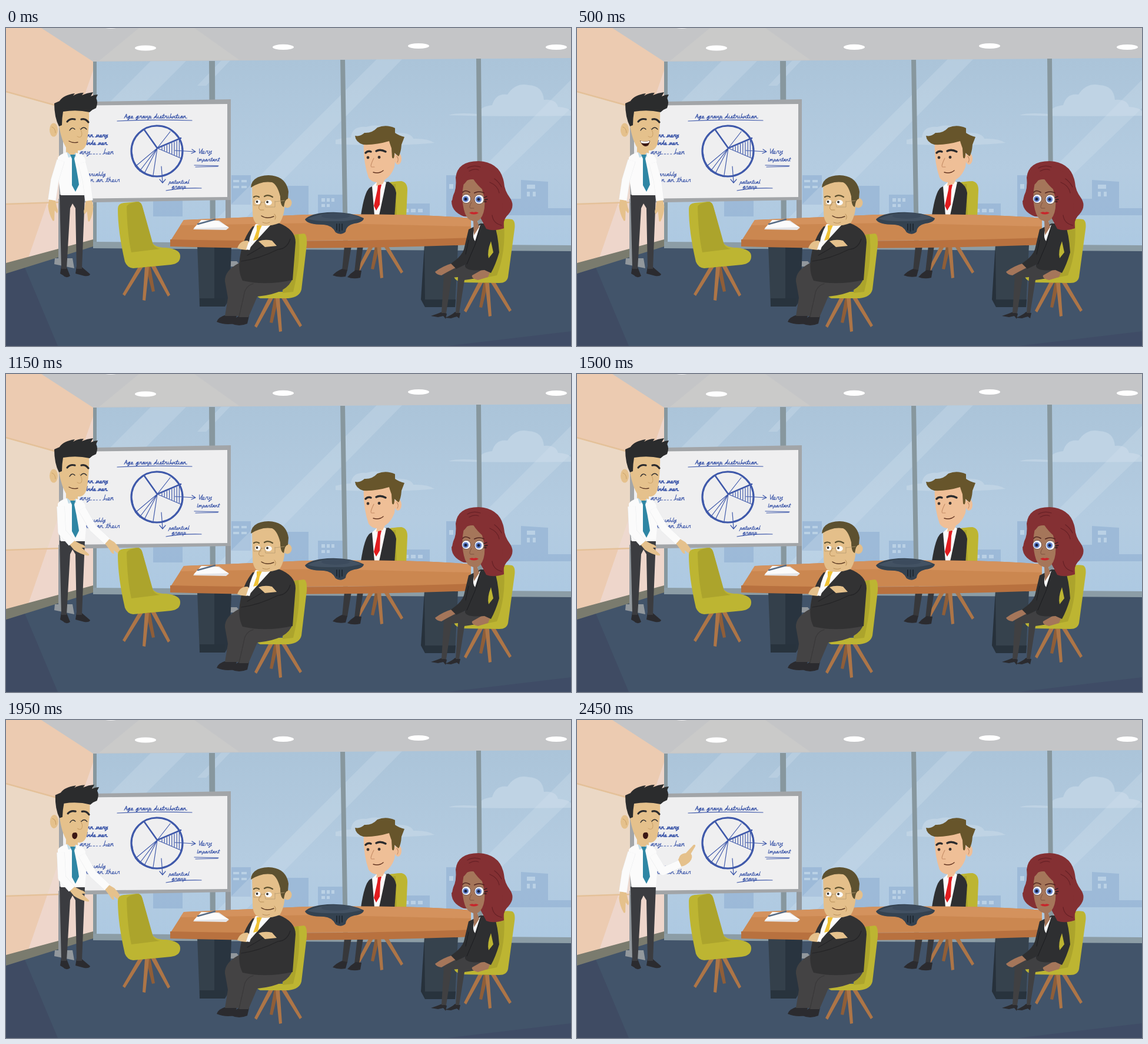
An HTML page for the animation above (2500 ms loop, 960x540 px).

```html
<!DOCTYPE html>
<html lang="en">
<head>
<meta charset="utf-8">
<title>Meeting room</title>
<style>
html, body { margin: 0; width: 100%; height: 100%; overflow: hidden; background: #42546a; }
svg { display: block; width: 100vw; height: 100vh; }
.line { fill: none; stroke-linecap: round; stroke-linejoin: round; }
.ink { stroke: #3f59aa; stroke-width: 1.2; }
.dark { stroke: #2b2b2d; }
.seat { fill: #bdb532; }
.shade { fill: #aca42c; }
.tan { fill: #e5c18c; }
.brown { fill: #a5765a; }
.suit { fill: #2e2f31; }
.shoe { fill: #2b2b2f; }
.white { fill: #fbfbfb; }
.town { fill: #8fb0d2; opacity: .6; }
.haze { fill: #d3e1ec; opacity: .28; }
</style>
</head>
<body>
<svg viewBox="0 0 960 540">
<defs>
  <linearGradient id="sky" x1="0" y1="0" x2="0" y2="1">
    <stop offset="0" stop-color="#abc4d9"/><stop offset=".6" stop-color="#b4cce1"/><stop offset="1" stop-color="#adc9e2"/>
  </linearGradient>
  <clipPath id="pane"><path d="M148 57L960 51V372L148 366z"/></clipPath>
  <g id="legs">
    <path fill="#8f5e38" d="M-5-3H3L-8 42L-13 41z"/>
    <path fill="#ad7547" d="M-14-2H-6L-35 50L-39 47zM-3 0H4L8 56L3 57zM6-2H14L42 46L38 49z"/>
  </g>
</defs>

<!-- room -->
<path fill="#c4c5c7" d="M0 0H960V60H0z"/>
<path fill="#cacac9" d="M226 0H320L396 54L158 56z"/>
<g fill="#fff">
  <ellipse cx="178" cy="-2" rx="13" ry="2.8"/><ellipse cx="237" cy="34" rx="18" ry="4.6"/>
  <ellipse cx="471" cy="32.4" rx="18" ry="4.6"/><ellipse cx="701" cy="30.5" rx="18" ry="4.6"/>
  <ellipse cx="935" cy="32.5" rx="18" ry="4.6"/>
</g>
<path fill="#42546a" d="M0 416L148 366H960V540H0z"/>
<path fill="#3f4b63" d="M0 417L32 407L88 540H0z"/>
<path fill="#3f4c66" d="M750 540L960 515V540z"/>
<path fill="url(#sky)" d="M148 57L960 51V372L148 366z"/>
<g clip-path="url(#pane)">
  <g fill="#bfd3e4">
    <path d="M752 148Q768 143 801 146Q806 133 826 131Q832 110 852 113Q866 92 888 97Q912 98 914 122Q934 120 938 134Q955 135 960 141V149Q850 151 752 148z"/>
    <path d="M560 190Q574 186 586 186Q588 166 612 168Q640 160 655 178Q688 176 692 188Q716 187 728 195Q660 202 560 197z"/>
  </g>
  <path class="town" d="M383 250H416V300H383zM470 268H514V330H470zM530 283H573V330H530zM668 298H720V320H668zM748 250H776V322H748zM840 290H875V258L921 261V306H960V318H840zM250 290H300V320H250z"/>
  <path fill="#c4d8ea" opacity=".75" d="M386 258h10v4h-10zM400 258h9v4h-9zM386 268h10v4h-10zM400 268h9v4h-9zM536 289h6v6h-6zM545 289h5v6h-5zM553 289h5v6h-5zM536 299h6v5h-6zM545 299h5v5h-5zM676 307h8v6h-8zM688 307h8v6h-8zM700 307h8v6h-8zM753 265h7v8h-7zM885 266h14v7h-14zM885 278h5v8h-5zM895 278h5v8h-5z"/>
  <path class="haze" d="M246 56H306L148 214V154zM366 55H381L340 98H325zM630 53H673L400 330H352zM960 88V136L800 290V248z"/>
</g>
<path fill="#87979e" d="M147 57H154V366H147zM345 56H355L356 368H347zM568 54H576L581 370H573zM799 52H807L810 372H802z"/>
<path fill="#8c9da6" d="M148 363L960 369V379L148 374z"/>
<path fill="#eccbb1" d="M0 0H60L148 57V362L0 400z"/>
<path fill="#ebd8c5" d="M0 109L148 150V294L0 299z"/>
<path fill="#efdad3" opacity=".8" d="M148 72V362L38 390z"/>
<path fill="none" stroke="#e4c199" stroke-width="2.5" d="M0 108L148 149M0 299L148 294"/>
<path fill="#7a7b6e" d="M0 399L148 359V371L0 417z"/>

<!-- whiteboard -->
<path fill="#92989d" d="M373 290H382V398H373zM89 290H96V395H89zM83 391H113L116 408L82 401zM376 396H392L400 405H376z"/>
<path fill="#a2a5a8" d="M90 126L382 121V292L90 297z"/>
<path fill="#efeff0" d="M97 132L376 129V287L97 290z"/>
<g class="line ink" id="notes">
  <path d="M189 158Q250 155 316 157"/>
  <ellipse cx="256.5" cy="209" rx="43.5" ry="43" stroke-width="3.2"/>
  <path stroke-width="2.6" d="M257 204L235 173M257 204L297 187M214 214Q216 245 250 252"/>
  <path d="M257 204L279 176M257 204L299 222M257 204L250 250M257 204L235 247M257 204L227 243M257 204L220 235"/>
  <path id="hatch"/>
  <path d="M287 208L321 210M316 206L322 210L315 213M320 233L361 234M322 236L360 235M264 235L266 262M261 257L266 263L271 257M272 276Q300 271 332 272"/>
</g>

<!-- presenter -->
<g>
  <path class="shoe" d="M94 404L103 406L109 421Q102 426 97 420L92 417zM120 404L129 406L143 418Q142 422 133 421L118 417z"/>
  <path fill="#3b3c40" d="M91 283H134L129 409H120L118 306L113 298L109 306L103 409H94z"/>
  <path class="tan" d="M102 200H122V216L113 221L102 214z"/>
  <path class="white" d="M88 220Q92 214 103 211L113 219L119 212Q132 214 135 224L137 250L134 284H93L88 250z"/>
  <path fill="#c3dce8" d="M103 210L113 218L106 220zM119 211L113 218L119 219z"/>
  <path fill="#2f86a4" d="M109 215H118L116 222Q121 244 124 266L118 278L112 267L112 222z"/>
  <g id="arms"></g>
  <g id="head">
    <ellipse class="tan" cx="81" cy="173" rx="7" ry="11.5"/>
    <path class="tan" d="M94 136H141Q142 165 138 190Q136 206 126 208Q110 208 104 206Q94 192 90 165z"/>
    <path class="line" stroke="#c9a067" d="M78 168Q84 170 84 178M125 170Q131 178 128 184Q125 187 121 184"/>
    <path fill="#2b2c2d" d="M90 167Q82 152 82 128L91 124Q97 114 117 111L114 115Q122 110 132 110L129 114Q138 110 148 109L144 116Q150 113 156 113L153 119Q157 126 153 136Q147 138 142 143Q120 138 97 142Q95 153 95 165z"/>
    <path class="line dark" stroke-width="3.2" d="M104 159Q109 153 117 155M128 155Q135 153 140 160"/>
    <path class="line dark" stroke-width="1.3" d="M108 174Q112 167 117 172M127 172Q132 166 137 172"/>
    <g id="mouths">
      <path class="line" stroke="#5a3524" stroke-width="1.3" d="M107 192Q114 196 122 194"/>
      <path fill="#3b1714" d="M116 191Q121 190 121 196Q120 202 116 202Q112 201 112 196Q112 191 116 191z"/>
      <g><path fill="#3b1714" d="M107 191Q115 194 124 191Q123 201 116 201Q110 200 107 191z"/><path fill="#fff" d="M108 191.5Q116 194 123.5 191.5L122 195Q115 197 109 195z"/></g>
      <g><path fill="#3b1714" d="M107 190Q116 193 124 190Q124 205 117 206Q110 203 107 190z"/><path fill="#fff" d="M108 191Q116 193.5 123.5 191L123 194Q116 196 109 194z"/><path fill="#c75a50" d="M112 202Q117 199 121 202Q117 208 112 202z"/></g>
    </g>
  </g>
</g>

<!-- man behind the table -->
<use href="#legs" x="633" y="368"/>
<path class="seat" d="M640 268Q644 261 672 260Q682 262 682 275L680 322H645z"/>
<path class="shade" d="M645 266L662 265L664 322H645z"/>
<path fill="#37383b" d="M575 370H587L580 412H571zM597 370H607L600 414H592z"/>
<path class="shoe" d="M555 420Q561 413 571 409L580 411L577 422Q565 424 555 420zM580 423Q586 416 594 411L604 412L602 424Q590 427 580 423z"/>
<path class="suit" d="M603 318Q609 278 618 271L634 263L650 261Q661 267 663 280L660 322H603z"/>
<path class="white" d="M622 269L634 258L646 262L634 318H626z"/>
<path fill="#e21c1f" d="M632 266H638L636 275L635 300L629 310L625 302L631 275z"/>
<g fill="#efbf97">
  <ellipse cx="666" cy="222" rx="6" ry="10"/>
  <path d="M608 190L658 188Q663 215 660 236Q654 252 644 257L640 265L629 268L630 262Q620 261 616 254Q606 225 608 190z"/>
</g>
<path fill="#67552b" d="M593 183Q602 185 609 178Q622 179 631 169Q646 163 661 170V178Q668 183 677 185L672 198Q671 212 667 218L660 212Q660 225 656 220L655 204Q652 196 651 192Q628 199 607 198Q594 194 593 183z"/>
<path class="line dark" stroke-width="3.4" d="M611 212Q615 208 620 210M629 209Q636 205 645 210"/>
<g fill="#3b3330"><circle cx="615" cy="220" r="2.4"/><circle cx="634" cy="219.5" r="2.4"/></g>
<path class="line" stroke="#c58c66" stroke-width="1.1" d="M625 221Q618 235 621 236L626 236M664 218Q668 222 665 228"/>
<path class="line" stroke="#633421" stroke-width="1.4" d="M624 245Q634 248 641 242"/>

<!-- table -->
<path fill="#34404b" d="M325 370H354V473H329z"/><path fill="#29343f" d="M354 370H383L380 460L372 473H354z"/>
<path fill="#28333d" d="M329 459H372V473H329z"/>
<path fill="#27313b" d="M711 368L705 461L712 474L716 368z"/><path fill="#36424d" d="M711 368H768L763 474H712z"/>
<path fill="#28333d" d="M712 461H764L763 474H712z"/>
<path fill="#cb8750" d="M302 326L510 317Q700 315 790 323V360L279 362z"/>
<path fill="#d4925d" d="M302 326L510 317Q700 315 790 323V337L530 331L296 335z"/>
<path fill="#b8713f" d="M279 359Q520 365 795 356V368Q520 378 279 371z"/>
<path fill="#e4e5e8" d="M318 342L332 326L362 327L379 339L374 343z"/><path class="white" d="M319 340L332 326L360 328L378 338z"/>
<path class="line" stroke="#566b84" stroke-width="2.4" d="M326 333L355 325"/>
<path fill="#344250" d="M508 325Q517 315 546 313Q583 311 608 323Q607 330 592 332Q578 335 577 346Q569 353 560 347Q554 335 540 334Q512 334 508 325z"/>
<path fill="#435263" d="M512 324Q530 315 560 314Q590 315 604 323Q586 327 574 328H546Q524 328 512 324z"/>
<ellipse fill="#3c4b5d" cx="560" cy="319" rx="24" ry="5"/>
<path class="line" stroke="#1f2933" stroke-width="2" d="M562 333V343M566.5 333V345M571 333V343"/>

<!-- empty chair -->
<use href="#legs" transform="translate(240 406) scale(-1 1)"/>
<path class="seat" d="M190 307Q190 298 200 297L222 295Q229 295 231 301L248 364Q253 373 272 373Q297 376 296 388Q296 400 280 402L216 408Q206 407 202 397Q190 345 190 307z"/>
<path class="shade" d="M205 303Q208 297 225 295Q230 296 232 304L250 368Q254 374 262 375L213 381Q206 350 205 303z"/>

<!-- man with glasses -->
<use href="#legs" x="461" y="459"/>
<path class="seat" d="M484 352L506 349Q512 350 511 368L502 444Q499 457 480 459H432Q424 456 427 448H470z"/>
<path class="shade" d="M484 352L497 350Q502 390 488 448L470 450z"/>
<path class="shoe" d="M358 499Q360 491 374 487L392 489L388 502Q372 505 358 499zM383 502Q388 493 397 488L413 489L410 502Q396 508 383 502z"/>
<path fill="#444344" d="M396 399Q371 412 372 430L377 458L372 489H394L397 491H412L427 456Q480 451 487 424L440 405z"/>
<path class="line" stroke="#3a393a" stroke-width="1.3" d="M396 490L404 455Q406 438 420 434"/>
<path fill="#323233" d="M419 337L463 331Q492 342 492 364L487 428Q440 438 402 429Q393 412 398 386Q403 356 419 337z"/>
<path class="white" d="M424 333L450 334L428 358L412 376Q411 356 424 333z"/>
<path fill="#f0c236" d="M426 335H435L431 344L428 359L420 361L426 344z"/>
<path class="line" stroke="#242426" stroke-width="1.2" d="M400 396Q430 392 462 376M462 376Q478 375 483 358M410 386Q426 377 437 370"/>
<path class="tan" d="M393 374Q397 361 410 361L418 366L409 377L400 376zM429 362Q440 358 452 361L460 370L440 372z"/>
<path class="white" d="M412 364L419 361L414 377L408 376z"/>
<g fill="#e4bf8a"><ellipse cx="478" cy="297" rx="7.5" ry="8.5"/>
<path d="M418 264Q440 254 458 257L474 292Q474 318 465 331Q447 338 430 335Q419 331 419 312z"/></g>
<path fill="#5d5130" d="M416 271Q417 251 446 250Q476 251 480 278L479 290Q474 290 472 304Q466 302 466 286Q461 266 452 262Q434 259 416 271z"/>
<path class="line" stroke="#5d5130" stroke-width="2.2" d="M421 287Q425 284 430 287M439 286Q445 282 453 287"/>
<g class="white"><ellipse cx="428" cy="295.500" rx="4.8" ry="4"/><ellipse cx="446" cy="296.500" rx="5.8" ry="4.5"/></g>
<g fill="#33302c"><circle cx="426.500" cy="295" r="1.9"/><circle cx="444" cy="295.500" r="1.9"/></g>
<path class="line" stroke="#b59b70" stroke-width=".8" d="M421 293V301H433V294M439 294L441 304H457V294M433 296H439M457 295L473 293"/>
<path class="line" stroke="#b88f59" d="M434 296Q426 306 432 309H438M456 316Q460 320 457 325M436 330Q443 333 448 330"/>
<path class="line" stroke="#5d3a23" stroke-width="1.4" d="M434 319Q443 325 455 320"/>

<!-- woman -->
<use href="#legs" x="817" y="433"/>
<path class="seat" d="M822 331Q845 322 860 325Q866 328 864 342L853 423Q851 433 838 433L776 432Q760 429 761 419L815 413z"/>
<path class="shade" d="M822 331L846 326Q850 380 834 420L815 424z"/>
<path class="shoe" d="M722 489Q734 485 741 482L749 485L747 494L743 489L734 491zM746 492Q758 487 763 482L772 484L770 493L766 490L756 493z"/>
<path fill="#404042" d="M781 402Q748 411 744 418L740 484H748L757 424L768 423L764 484H770L779 428Q816 424 822 410z"/>
<path class="brown" d="M760 399L764 407Q750 414 740 420Q731 419 729 414Q742 404 760 399zM825 409L819 423L802 428Q790 425 792 420L808 411z"/>
<path class="suit" d="M786 342L806 332L829 331Q836 350 838 381Q832 402 824 416L813 411Q778 414 780 402L765 409L756 400Q774 388 778 376z"/>
<path class="seat" d="M824 362L828 381L820 391Q817 380 824 362z"/>
<path class="line" stroke="#1c1d20" d="M786 360L781 384M804 344Q799 365 794 375L783 401"/>
<path class="white" d="M795 344L806 334L797 362Q792 356 795 344z"/>
<path fill="#843033" d="M764 254Q767 226 803 226Q840 228 846 262Q847 276 856 288Q866 302 854 316Q843 326 846 340Q828 346 816 341L806 322L778 320Q752 308 760 284Q766 272 764 254z"/>
<path class="brown" d="M778 262Q792 252 806 262L813 290Q815 312 806 324L801 328L804 338L795 352L794 328Q784 326 780 315Q772 292 778 262z"/>
<path fill="#843033" d="M766 280Q768 248 790 240Q787 258 777 266Q772 285 775 300Q775 312 778 320Q757 312 757 294zM786 243Q798 266 812 276Q812 290 816 300Q819 318 812 329Q818 340 830 343L846 340L840 250L800 232z"/>
<path class="line" stroke="#672126" stroke-width="1.3" d="M784 238Q794 232 806 236M787 243Q796 238 803 241M822 262Q836 268 838 280M830 256Q838 262 842 270M826 318Q828 332 842 335"/>
<path class="line" stroke="#512621" stroke-width="1.7" d="M776 279Q780 274 788 279M796 280Q804 276 812 280"/>
<g class="white" stroke="#5b403a" stroke-width=".8"><circle cx="782" cy="290" r="7.6"/><circle cx="804" cy="291" r="8"/></g>
<g fill="#6484cf"><circle cx="781" cy="290.5" r="5"/><circle cx="803" cy="291" r="5.2"/></g>
<g fill="#17213d"><circle cx="781" cy="290.5" r="2.5"/><circle cx="803" cy="291" r="2.5"/></g>
<path class="line" stroke="#2b1d1d" stroke-width="1.3" d="M812 288L817 286M813 292L818 291M812 295L816 295"/>
<path class="line" stroke="#7f5340" d="M791 296Q786 304 789 306L795 306"/>
<path fill="#c8262c" d="M787 314Q791 311 795 313Q799 311 803 314Q795 319 787 314z"/>
</svg>

<script>
const LOOP = 2500;
const NS = 'http://www.w3.org/2000/svg';
const $ = id => document.getElementById(id);

function add(parent, tag, attrs) {
  const el = document.createElementNS(NS, tag);
  for (const k in attrs) el.setAttribute(k, attrs[k]);
  return parent.appendChild(el);
}

// Pen strokes; each letter starts and ends on the baseline.
const pen = {
  a: 'q0-5 4-5q-4 0-4 4q1 2 4-4q-1 4 1 5',
  b: 'l1-10q-1 9 0 9q5-4 3 1h1',
  d: 'q0-5 4-4q-4-1-4 3q2 2 4-9q-1 9 1 10',
  e: 'q4-1 3-4q-2-1-3 1q0 4 4 3',
  g: 'q0-5 4-5q-4 0-4 4q1 2 4-4q0 9-3 9q-2-1 4-4',
  h: 'l1-10l-1 10q1-5 3-5q0 4 2 5',
  i: 'l1-5q-1 5 2 5',
  l: 'l2-10q-2 9 1 10',
  m: 'l0-5v5q1-5 3-5v5q1-5 3-5q0 4 2 5',
  n: 'l0-5v5q1-5 3-5q0 4 2 5',
  o: 'q0-5 3-5q3 4-1 5q-4-1 1-4l2 4',
  p: 'l1-5l-2 9l2-8q5-1 3 3q-2 2-2 0l3 1',
  r: 'l1-5q1 1 3 0q-1 4 1 5',
  s: 'l2-5q3 5-1 5h3',
  t: 'l2-9q-2 9 1 9m-4-6h5m-1 6',
  u: 'l0-5q0 6 4 0q-1 5 1 5',
  v: 'l1-5q0 4 1 5q2-2 2-5l2 5',
  y: 'l0-5q0 6 4 0q-1 9-4 9q0-2 5-4',
  A: 'l3-9l3 9m-5-3h4m1 3',
  I: 'v-9m0 9h2',
  V: 'm0-9l2 9l4-9l-1 9',
  '.': 'h1m3 0', '-': 'm0-3h4m2 3', ' ': 'm4 0'
};

function write(x, y, size, text, weight = 1) {
  add($('notes'), 'path', {
    d: 'M0 0' + [...text].map(c => pen[c]).join('h2'),
    transform: `translate(${x} ${y}) scale(${size}) skewX(-12)`,
    'stroke-width': weight / size
  });
}
write(201, 153, .75, 'Age group distribution.', 1.2);
write(136, 185, .75, 'mn very', 1.5);
write(134, 198, .7, 'dude ver.', 1.5);
write(113, 214, .9, '- any..  ben', 1.1);
write(134, 251, .68, 'variably');
write(128, 261, .8, 'even on their');
write(327, 213, .9, 'Very');
write(325, 226, .65, 'Important');
write(277, 264, .65, 'potential');
write(282, 272, .7, 'group');

let hatch = '';
for (let x = 265; x < 298; x += 4.2) hatch += `M${x} ${206 - (x - 257) * .42}V${203 + (x - 257) * .43}`;
$('hatch').setAttribute('d', hatch);

// Per arm: elbow x, y, wrist x, y, hand angle.
const down = [[83, 258, 78, 292, 88], [137, 260, 141, 293, 88]];
const out = [[95, 268, 112, 287, 38], [148, 262, 172, 284, 42]];
const point = [[83, 258, 78, 292, 88], [146, 257, 175, 244, -47]];
const poses = [[0, down], [650, down], [850, out], [2250, out], [2400, point]];
const tilts = [[0, 0], [1550, 0], [1700, 2.5], [1850, 2.5], [2050, 0]];
const CLOSED = 0, ROUND = 1, SMILE = 2, WIDE = 3;
const speech = [
  [0, CLOSED], [100, ROUND], [200, SMILE], [300, ROUND], [400, SMILE], [600, ROUND],
  [700, WIDE], [800, ROUND], [900, SMILE], [1000, CLOSED], [1600, ROUND],
  [1850, SMILE], [1950, ROUND], [2100, WIDE], [2300, ROUND]
];

const shoulders = [[93, 225], [129, 229]];
const openHand = 'M-2-4.5L10-7Q24-6 35 0Q37 3 33 3L18 4L23 8Q20 11 13 8L-2 5z';
const pointHand = 'M-2-5L9-9Q15-10 20-5L39-5Q43-3 39-1L25 2Q24 9 14 10Q5 10-2 5z';
const arms = shoulders.map(() => ({
  hand: add($('arms'), 'path', { class: 'tan' }),
  edge: add($('arms'), 'path', { class: 'line', stroke: '#e6e8ea', 'stroke-width': 13.6, style: 'stroke-linecap:butt' }),
  sleeve: add($('arms'), 'path', { class: 'line', stroke: '#fbfbfb', 'stroke-width': 12.8, style: 'stroke-linecap:butt' })
}));
const mouths = [...$('mouths').children];

// The active step, the one after it, and eased progress between them.
function span(steps, t) {
  let i = steps.length - 1;
  while (steps[i][0] > t) i--;
  const [t0, from] = steps[i];
  const [t1, to] = steps[i + 1] || [LOOP, from];
  const k = (t - t0) / (t1 - t0);
  return { from, to, k: k * k * (3 - 2 * k) };
}
const mix = (a, b, k) => a + (b - a) * k;

function draw(t) {
  const { from, to, k } = span(poses, t);
  const pointing = (k < .5 ? from : to) === point;
  arms.forEach((arm, i) => {
    const [ex, ey, wx, wy, turn] = from[i].map((v, j) => mix(v, to[i][j], k));
    const d = `M${shoulders[i]}L${ex} ${ey}L${wx} ${wy}`;
    arm.sleeve.setAttribute('d', d);
    arm.edge.setAttribute('d', d);
    arm.hand.setAttribute('d', pointing && i ? pointHand : openHand);
    arm.hand.setAttribute('transform', `translate(${wx} ${wy}) rotate(${turn})` + (i ? '' : ' scale(1 -1)'));
  });
  const tilt = span(tilts, t);
  $('head').setAttribute('transform', `rotate(${mix(tilt.from, tilt.to, tilt.k)} 110 210)`);
  const mouth = span(speech, t).from;
  mouths.forEach((m, i) => m.setAttribute('visibility', i === mouth ? 'visible' : 'hidden'));
}

const start = performance.now();
function tick() {
  draw((performance.now() - start) % LOOP);
  requestAnimationFrame(tick);
}
tick();
</script>
</body>
</html>
```
